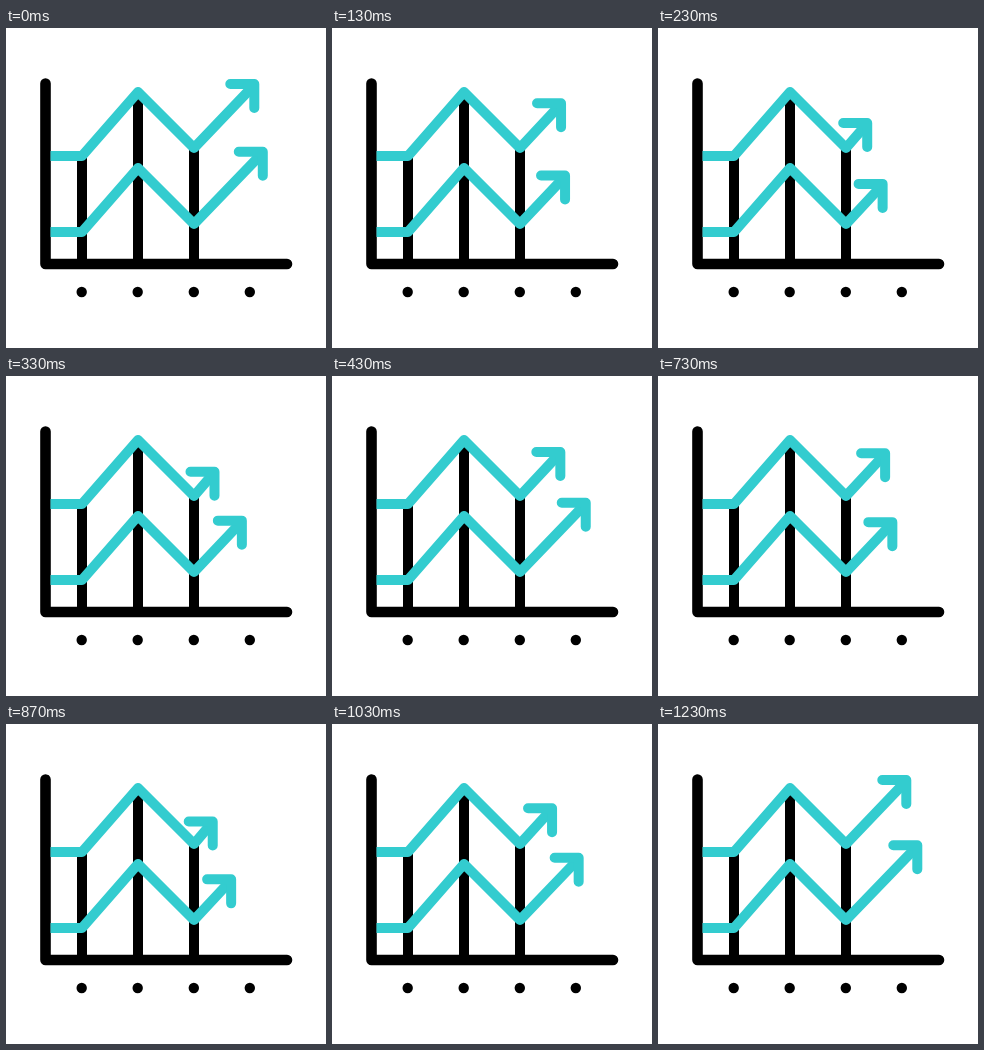
Write an HTML page that moves like this. It is 320 px wide and 320 px high and loops after 1670 ms.

```html
<!DOCTYPE html>
<html lang="en">
<head>
<meta charset="utf-8">
<title>Growth chart</title>
<style>
  html, body { margin: 0; width: 100%; height: 100%; overflow: hidden; background: #fff; }
  svg { display: block; width: 100vw; height: 100vh; }
  path { fill: none; stroke: #000; stroke-width: 10; stroke-linejoin: round; }
  .round { stroke-linecap: round; }
  .teal path { stroke: #33cccf; }
</style>
</head>
<body>
<svg viewBox="0 0 320 320">
  <path d="M76 128V236M132 64V236M188 120V236"/>
  <path class="round" style="stroke-width:10.6" d="M39.5 55.5V236H281"/>
  <g>
    <circle cx="75.7" cy="264" r="5.2"/>
    <circle cx="131.7" cy="264" r="5.2"/>
    <circle cx="187.8" cy="264" r="5.2"/>
    <circle cx="243.8" cy="264" r="5.2"/>
  </g>
  <g class="teal">
    <path id="lowLine"/>
    <path id="lowHead" class="round" d="M-24 0H0V24"/>
    <path id="topLine"/>
    <path id="topHead" class="round" d="M-24 0H0V24"/>
  </g>
</svg>
<script>
  const LOOP = 1670, LAST = 37;
  const $ = id => document.getElementById(id);

  // keys: ticks (1/30 s) at which the arrow is alternately fully out and pulled in.
  // sum: x + y of the arrow tip, constant along its diagonal path.
  const arrows = [
    { line: $('topLine'), head: $('topHead'), base: 128, sum: 304.3,
      out: 56, pulled: 99, keys: [0, 8.6, 17, 27.1, 37] },
    { line: $('lowLine'), head: $('lowHead'), base: 204, sum: 380.5,
      out: 118.7, pulled: 156, keys: [-2, 6.7, 15.7, 25.2, 35.5, 45] }
  ];

  // The motion advances in 1/30 s ticks, rounded to 10 ms, then rests.
  function tickAt(ms) {
    const rest = ms % 100;
    const part = rest >= 70 ? 2 : rest >= 30 ? 1 : 0;
    return Math.min(LAST, 3 * Math.floor(ms / 100) + part);
  }

  function tipY({ keys, out, pulled }, tick) {
    let i = 0;
    while (i < keys.length - 2 && tick >= keys[i + 1]) i++;
    const p = (tick - keys[i]) / (keys[i + 1] - keys[i]);
    const eased = p * p * (3 - 2 * p);
    return out + (pulled - out) * (i % 2 ? 1 - eased : eased);
  }

  function draw(ms) {
    const tick = tickAt(ms % LOOP);
    for (const a of arrows) {
      const y = tipY(a, tick), x = a.sum - y, b = a.base;
      a.head.setAttribute('transform', `translate(${x} ${y})`);
      a.line.setAttribute('d',
        `M44.5 ${b}H76L132 ${b - 64}L188 ${b - 8}L${x - 3} ${y + 4}`);
    }
  }

  const start = performance.now();
  function loop() {
    draw(performance.now() - start);
    requestAnimationFrame(loop);
  }
  loop();
</script>
</body>
</html>
```
